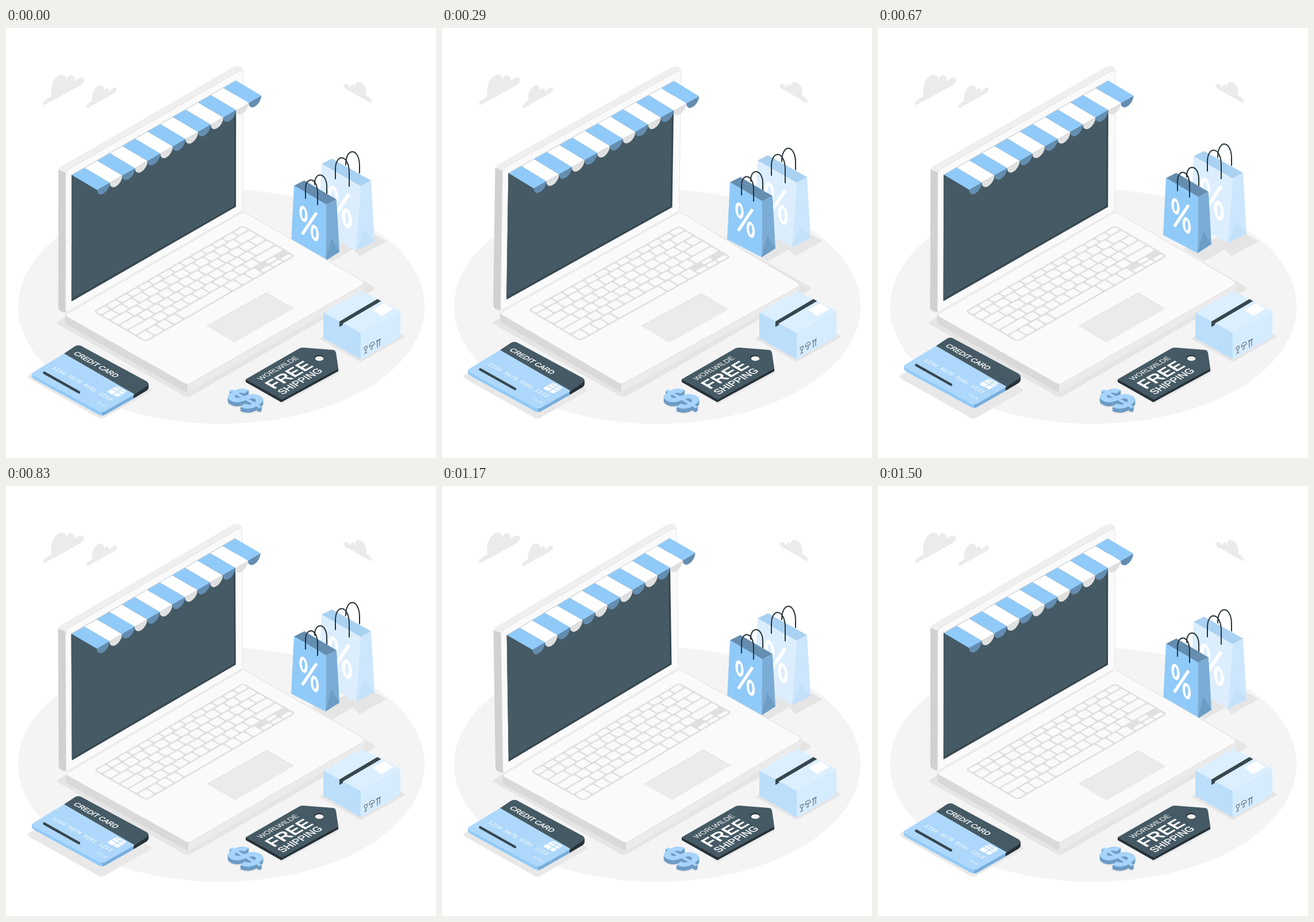
An HTML page for the animation above (1540 ms loop, 748 by 748 pixels).

```html
<!DOCTYPE html>
<html lang="en">
<head>
<meta charset="utf-8">
<title>Online shop</title>
<style>
html, body { margin: 0; width: 100%; height: 100%; overflow: hidden; background: #fff; }
svg { display: block; width: 100vw; height: 100vh; }
text { font-family: "Liberation Sans", Arial, sans-serif; }
.mono { font-family: "Liberation Mono", monospace; }
.ring { fill: none; stroke: #fff; }
.cord { fill: none; stroke: #263238; stroke-width: 2; stroke-linecap: round; }
.ink { fill: none; stroke: #37474f; stroke-width: .9; }
</style>
</head>
<body>
<svg viewBox="0 0 748 748">
  <ellipse cx="374.5" cy="484.5" rx="353.5" ry="204" fill="#f4f4f4"/>

  <g id="clouds" fill="#ebebeb">
    <path d="M66 134.500Q62 130 69 125L79 119C76 98 86 81 98 81C104 82 105 87 105 91C107 83 113 79 117 84Q120 87 119 93C124 87 133 84 135 88C137 92 134 97 129 100Z"/>
    <path d="M141 140Q137 136 144 131L150 127C148 115 156 99 165 100C170 101 171 105 171 109C174 103 180 104 180 111C185 104 191 102 193 105C193 110 191 112 187 114Z"/>
    <path d="M635 131Q638 126 632 121L627 118C628 108 624 95 614 94C608 94 607 98 607 102C604 95 599 98 599 104C595 97 589 96 587 99C588 104 591 107 595 108Z"/>
  </g>

  <g id="shadows" fill="#e5e5e5">
    <path d="M93 509L400 330H430L638 449Q645 453 638 457L322 640Q316 643 310 640L93 517Q85 513 93 509Z"/>
    <path d="M530 384L567 406L604 385L615 397L662 371L630 352Z"/>
    <path d="M545 541L617 581L695 537L680 528L560 530Z"/>
    <path d="M42 602L125 555L250 627Q255 630 250 633L171 678Q166 681 161 678L42 611Q34 606 42 602Z" fill="#e8e8e8"/>
  </g>

  <g id="bags">
    <path d="M549 236L567 227L635 265L617 275Z" fill="#a9d1f2"/>
    <path d="M549 236L617 275L609 387L543 350Z" fill="#dceefe"/>
    <path d="M617 275L635 265L641 371L609 387Z" fill="#cce6fd"/>
    <path d="M624 349L641 371L609 387Z" fill="#c4e1fa"/>
    <g class="percent" transform="translate(581 311) scale(1.2)"></g>
    <path class="cord" d="M573 262V246C573 217 597 219 597 252V275M591 238C591 206 615 208 615 240V252"/>

    <path d="M501 274L519 265L575 298L557 307Z" fill="#648db0"/>
    <path d="M501 274L557 307L556 404.500L496 373.500Z" fill="#90caf9"/>
    <path d="M557 307L575 298L580 389L556 404.500Z" fill="#7aacd5"/>
    <path d="M566 366L580 389L556 404.500Z" fill="#6c9dc5"/>
    <g class="percent" transform="translate(527 340)"></g>
    <path class="cord" d="M521 296V280C521 257 542 259 542 287V307M537 272C536 249 558 250 558 276V287"/>
  </g>

  <g id="laptop">
    <path d="M103 500V510Q103 514 109 518L310 631.500Q316 635 316 633V617Z" fill="#d9d9d9"/>
    <path d="M316 617V633.500L322 631L619 459Q625 455 624 443Z" fill="#ebebeb"/>
    <path d="M107 497L408 322Q412 319 418 322L618 438Q626 443 618 448L321 618Q316 620.500 311 618L107 503Q102 500 107 497Z" fill="#fafafa" stroke="#e0e0e0"/>

    <path d="M91 250Q91 244 97 240.500L395 68Q403 64 409 68Q413 71 412 77L104 256V495Z" fill="#efefef"/>
    <path d="M91 247L104 252V495Q91 494 91 485Z" fill="#d1d1d1"/>
    <path d="M104 256Q104 249 109 246L404 75.500Q412 71 412 80V312Q412 317 408 320L108 493.500Q104 496 104 491Z" fill="#fafafa" stroke="#e4e4e4"/>
    <path d="M114 256L400 91V311L114 476Z" fill="#37474f"/>
    <path d="M114 256L397 93V309L114 472Z" fill="#455a64"/>

    <g id="keys" transform="matrix(.866 -.5 .866 .5 151.500 493.500)"></g>
    <path d="M349 518.500L453 460.500L500 488L397.500 547Z" fill="#ebebeb"/>
    <path d="M349 518.500L453 460.500L500 488" fill="none" stroke="#e0e0e0"/>
    <g id="awning"></g>
  </g>

  <g id="box">
    <path d="M552 495L618 457L686 492L617 530.500Z" fill="#dcefff"/>
    <path d="M552 495L617 530.500V576.500L552 539Z" fill="#bbdefb"/>
    <path d="M617 530.500L686 492V537.500L617 576.500Z" fill="#d5ebfe"/>
    <path d="M646 471.500L652.500 475L586 514V516.500L580 520V510.500Z" fill="#37474f"/>
    <path d="M637 490L658 478.500L674 488.500L653 501Z" fill="#fff"/>
    <path class="ink" d="M623 556L628 553Q629 559 626 560Q623 561 623 556M626 560V565M623 567L628 564
      M632 555Q633 547 637 547Q641 545 641 550ZM637 552V558Q635 561 634 557
      M646 556V543L644 546M646 543L648 544M650 553V541L648 544M650 541L652 542"/>
  </g>

  <g id="tag">
    <path d="M414 613L513 559L575 567L580 600L480 654Z" fill="#e8e8e8"/>
    <path d="M417 611L480 645L578 592V597L479 651L417 616Z" fill="#263238"/>
    <path d="M417 611L511 557Q514 555.500 518 556L569 560Q573 560.500 574 565L578 592L480 646.500Z" fill="#455a64"/>
    <ellipse cx="544.500" cy="574" rx="8.500" ry="5" fill="#263238"/>
    <ellipse cx="545" cy="575" rx="7.500" ry="4" fill="#f4f4f4"/>
    <g fill="#fff">
      <text font-size="12.7" transform="matrix(.866 -.5 .866 .5 443.500 613.500)">WORLWILDE</text>
      <text font-size="30.5" font-weight="700" transform="matrix(.866 -.5 .866 .5 466 629)">FREE</text>
      <text font-size="17.2" stroke="#fff" stroke-width=".5" transform="matrix(.866 -.5 .866 .5 481 638)">SHIPPING</text>
    </g>
  </g>

  <g id="dollar" font-size="72" font-weight="700" text-anchor="middle" stroke-width="1.500"></g>

  <g id="card">
    <path d="M45 600V605Q45 608 50 611L161 672Q167 675 173 672L224 643V630Z" fill="#90caf9"/>
    <path d="M167 666V674Q170 674 173 672L224 643V630Z" fill="#78aedb"/>
    <path d="M222 636V644L244 631Q248 628 248 625V618Z" fill="#263238"/>
    <path d="M49 597.500L101 566L224 637L173 666Q167 669 161 666L49 605.500Q42 601.500 49 597.500Z" fill="#aed8fb"/>
    <path d="M101 566L119 554Q125 550 131 553L244 614Q251 618 245 623L224 637Z" fill="#455a64"/>
    <text font-size="12.5" fill="#fff" stroke="#fff" stroke-width=".5" transform="matrix(.866 .49 -.866 .5 116.500 566.500)">CREDIT CARD</text>
    <g fill="#fff">
      <text class="mono" font-size="10.4" transform="matrix(.866 .48 -.866 .5 79 591.500)">1234 5678 9101 1213</text>
      <text class="mono" font-size="5.500" transform="matrix(.866 .5 -.866 .5 158 651)">12/20</text>
      <path d="M178 631L190 624Q192 623 195 624L207 630Q210 632 207 634L195 641Q193 642 190 640L178 634Q176 632 178 631Z"/>
    </g>
    <path d="M66.500 599.500L127 633.500" stroke="#37474f" stroke-width="4.500" stroke-linecap="round"/>
    <path d="M184 628L201 637M190 625L206 634M186 638L201 628" stroke="#aed8fb" stroke-width="1.300" fill="none"/>
  </g>
</svg>
<script>
const $ = id => document.getElementById(id);

// Percent signs on the bags
for (const g of document.querySelectorAll('.percent')) {
  const ring = (x, y) => `<ellipse class="ring" rx="5.800" ry="11.200" stroke-width="5" transform="matrix(.866 .5 0 1 ${x} ${y})"/>`;
  g.innerHTML = ring(-9.5, -16.8) + ring(10, 16.5) +
    '<path d="M11 -20.500L15.500 -17.500L-9.500 20L-14 17Z" fill="#fff"/>';
}

// Awning: 13 stripes, each ending in a half-round flap
const STEP = [21.95, -12.66], DROP = [44, 26];
let cloth = '', flaps = '';
for (let i = 0; i < 13; i++) {
  const blue = i % 2 === 0;
  const x = 114.5 + i * STEP[0], y = 256 + i * STEP[1];
  const bx = x + DROP[0], by = y + DROP[1];
  cloth += `<path d="M${x} ${y}l${STEP}l${DROP}L${bx} ${by}Z" fill="${blue ? '#90caf9' : '#fff'}"/>`;
  flaps += `<path transform="matrix(1 -.577 0 1.150 ${bx} ${by})" d="M0 0A11 11 0 0 0 22 0Z" fill="${blue ? '#648db0' : '#e0e0e0'}"/>`;
}
$('awning').innerHTML = flaps + cloth +
  '<path d="M114.500 256L399.850 91.420" stroke="#d8e2ea" stroke-width=".8"/>';

// Keyboard: each row lists key widths that share the full length
const key = (x, y, w, h) => `<rect x="${x}" y="${y}" width="${w}" height="${h}" rx="3" fill="#fafafa"/>`;
const same = n => Array(n).fill(1);
const rows = [
  [3, 10, same(14)],
  [16, 14.5, [...same(13), 1.6]],
  [33.5, 14.5, [1.6, ...same(13)]],
  [51, 14.5, [1.8, ...same(11), 1.9]],
  [68.5, 14.5, [2.3, ...same(10), 2.3]]
];
let board = '<rect width="301" height="106" rx="6" fill="#e0e0e0"/>';
for (const [y, h, widths] of rows) {
  const unit = 298 / widths.reduce((a, b) => a + b);
  let x = 3;
  for (const w of widths) {
    board += key(x, y, w * unit - 3, h);
    x += w * unit;
  }
}
for (let i = 0; i < 4; i++) board += key(3 + i * 19.2, 86, 16.2, 17);
board += key(80, 86, 94, 17);
for (let i = 0; i < 3; i++) board += key(177 + i * 21, 86, 18, 17);
for (let i = 0; i < 3; i++) board += key(240 + i * 20, 96, 17.5, 7);
board += key(260, 86, 17.5, 7);
$('keys').innerHTML = board;

// Extruded dollar sign
const sign = (dy, color) => `<text fill="${color}" stroke="${color}" transform="matrix(.866 -.5 .866 .5 437.500 ${657 + dy})">$</text>`;
let coin = sign(9, '#e4e4e4');
for (let d = 7; d > 0; d--) coin += sign(d, '#6d9cc4');
$('dollar').innerHTML = coin + sign(0, '#a6d4fa');

// Motion: linear sway and float over 1.5 s, sampled mid-step at 24 steps a second
const LOOP = 1540, CYCLE = 1500, TICK = 1000 / 24, REST = .6;

function draw(ms) {
  const t = (Math.floor((ms % LOOP + 5) / TICK) + .5) * TICK;
  const p = t % CYCLE / CYCLE;
  const angle = p < .25 ? p * 4 : p < .75 ? 2 - p * 4 : p * 4 - 4;
  const lift = REST - 14.96 * (1 - Math.abs(1 - p * 2));
  $('laptop').setAttribute('transform', `rotate(${angle} 357 349)`);
  for (const id of ['bags', 'card']) $(id).setAttribute('transform', `translate(0 ${lift})`);
}

const start = performance.now();
function loop() {
  draw(performance.now() - start);
  requestAnimationFrame(loop);
}
draw(0);
requestAnimationFrame(loop);
</script>
</body>
</html>
```
